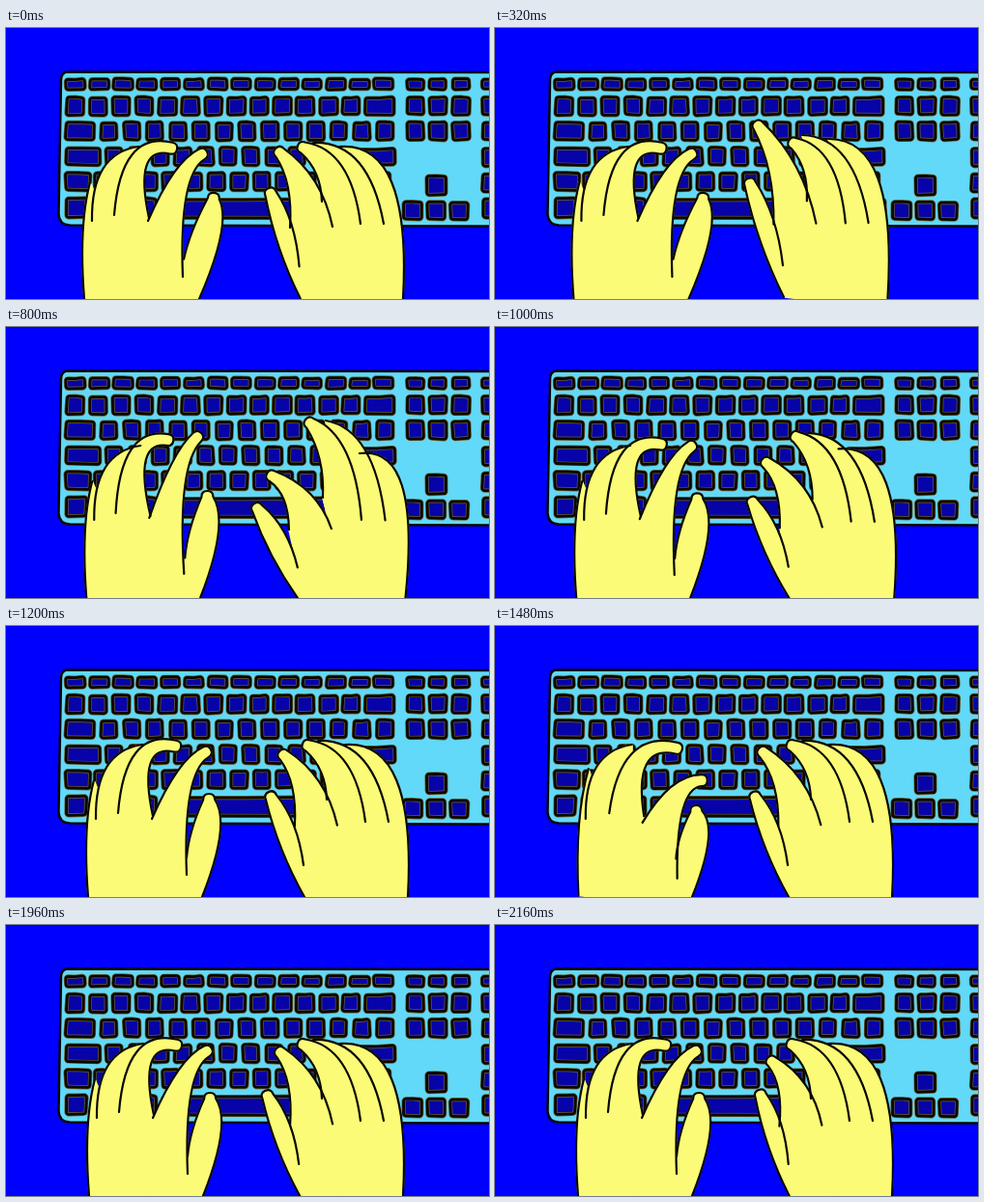
These frames come from a looping animation (500 px wide and 281 px high, 2.2 s). An HTML page with a canvas:

```html
<!DOCTYPE html>
<html lang="en">
<head>
<meta charset="utf-8">
<title>Typing hands</title>
<style>
html, body { margin: 0; width: 100%; height: 100%; overflow: hidden; background: #00f; }
canvas { display: block; }
</style>
</head>
<body>
<canvas id="stage" width="500" height="281"></canvas>
<script>
const LOOP = 2200, STEP = 40;
const SKIN = '#fcfb77', INK = '#080804';
const ctx = document.getElementById('stage').getContext('2d');

// Resting fingers, left to right: base, knuckle, tip, and for whole fingers knuckle and base again.
const hands = {
  left: {
    wrist: [140, 285],
    fingers: {
      pinky: [[86, 281], [80, 205], [92, 160]],
      ring: [[94, 200], [93, 130], [142, 123]],
      middle: [[117, 194], [124, 106], [182, 126], [137, 122], [153, 197]],
      index: [[152, 200], [179, 138], [213, 128], [184, 152], [188, 258]],
      thumb: [[188, 240], [190, 214], [211, 174], [234, 205], [204, 281]]
    }
  },
  right: {
    wrist: [355, 285],
    fingers: {
      thumb: [[304, 281], [277, 233], [267, 172], [297, 202], [303, 248]],
      index: [[294, 207], [297, 160], [279, 125], [327, 153], [338, 206]],
      middle: [[327, 180], [326, 148], [302, 122], [357, 126], [367, 203]],
      ring: [[391, 203], [375, 117], [318, 119]],
      pinky: [[411, 281], [420, 118], [346, 123]]
    }
  }
};

// Each gesture swells and fades around its moment; "all" carries the whole hand.
const gestures = [
  { at: 0, span: 1700, left: { all: [-5, 0] } },
  { at: 0, span: 300, right: { thumb: [5, -6] } },
  { at: 160, span: 520, left: { thumb: [12, -4] } },
  { at: 320, span: 320, right: { all: [-5, 0], thumb: [0, -16], index: [-5, -28],
    middle: [7, -5], ring: [5, -8], pinky: [4, -8] } },
  { at: 800, span: 360,
    left: { middle: [-6, -8], index: [-8, -18], thumb: [0, -4] },
    right: { thumb: [-10, 11], index: [-9, 27], middle: [8, -26], ring: [13, -22], pinky: [20, 8] } },
  { at: 1200, span: 300, right: { all: [5, 0], index: [-1, 5] } },
  { at: 1480, span: 280,
    left: { pinky: [5, -12], middle: [12, 2], index: [7, 32], thumb: [-3, 12] },
    right: { index: [-6, 2] } },
  { at: 2160, span: 300, right: { thumb: [6, -1], index: [3, 13] } }
];

let seed = 7;
const random = () => (seed = seed * 16807 % 2147483647) / 2147483647;
const wobble = v => v + (random() - .5) * 1.4;

function drawKey(g, x, y, w, h) {
  const c = [[x, y], [x + w, y], [x + w, y + h], [x, y + h]].map(p => p.map(wobble));
  const path = new Path2D();
  path.moveTo((c[0][0] + c[1][0]) / 2, c[0][1]);
  for (let i = 1; i <= 4; i++) path.arcTo(...c[i % 4], ...c[(i + 1) % 4], 2.5);
  path.closePath();
  g.fillStyle = '#0703a8';
  g.fill(path);
  for (const [color, width] of [['#6b6132', 4.2], ['#0a0804', 2.8]]) {
    g.strokeStyle = color;
    g.lineWidth = width;
    g.stroke(path);
  }
}

function drawKeyboard() {
  const sheet = document.createElement('canvas');
  sheet.width = 500;
  sheet.height = 281;
  const g = sheet.getContext('2d');
  g.fillStyle = '#00f';
  g.fillRect(0, 0, 500, 281);
  g.beginPath();
  g.moveTo(510, 46);
  g.lineTo(64, 45.5);
  g.quadraticCurveTo(57, 46, 57, 54);
  g.lineTo(54.5, 193);
  g.quadraticCurveTo(55, 204, 66, 204.5);
  g.lineTo(510, 205.5);
  g.fillStyle = '#62d9f8';
  g.fill();
  g.strokeStyle = INK;
  g.lineWidth = 2.5;
  g.stroke();

  const row = (x, y, w, h, n = 1, pitch = 0) => {
    for (let i = 0; i < n; i++) drawKey(g, x + i * pitch, y, w, h);
  };
  row(62.5, 53, 19, 10.5, 14, 24.5);
  row(63, 72, 17.5, 18, 13, 23.8);
  row(372, 72, 30, 18);
  row(62, 98, 29, 18);
  row(98.5, 98, 16, 18, 13, 23.8);
  row(62, 124.5, 35, 17.5);
  row(104, 124.5, 16, 17.5, 11, 23.6);
  row(364, 125.5, 38, 16.5);
  row(62, 150.5, 25, 17.5);
  row(92, 150.5, 16.5, 17.5, 11, 23.5);
  row(351, 150.5, 46, 17.5);
  row(62, 177, 21, 19);
  row(90, 177, 18, 19, 3, 23.5);
  row(162, 178, 170, 19);
  row(339, 178, 18, 19, 3, 23.5);
  // Side block and the column cut by the edge
  for (const [y, h] of [[53, 10.5], [72, 17.5], [98, 18]]) {
    row(415, y, 17, h, 3, 23.7);
    row(493.5, y, 20, h);
  }
  row(436, 154, 20, 19);
  row(412, 180.5, 18, 17.5, 3, 24);
  for (let i = 0; i < 3; i++) row(493.5, 125 + i * 26.5, 20, 18);
  return sheet;
}

const keyboard = drawKeyboard();

function shift(side, name, t) {
  const sum = [0, 0];
  for (const g of gestures) {
    const u = (t - g.at) / g.span, move = g[side] && g[side][name];
    if (!move || Math.abs(u) >= 1) continue;
    const swell = Math.cos(u * Math.PI / 2) ** 2;
    sum[0] += move[0] * swell;
    sum[1] += move[1] * swell;
  }
  return sum;
}

// Tips follow a gesture fully, knuckles half, bases barely.
const follow = [.12, .5, 1, .5, .12];

function pose(side, name, t) {
  const all = shift(side, 'all', t), own = shift(side, name, t);
  return hands[side].fingers[name].map((p, i) =>
    p.map((v, axis) => v + all[axis] + own[axis] * follow[i]));
}

function outline([base, knuckle, tip, knuckle2, base2]) {
  const path = new Path2D();
  path.moveTo(...base);
  if (!base2) {
    path.quadraticCurveTo(...knuckle, ...tip);
    return path;
  }
  const r = 6;
  const dx = tip[0] - (knuckle[0] + knuckle2[0]) / 2;
  const dy = tip[1] - (knuckle[1] + knuckle2[1]) / 2;
  const len = Math.hypot(dx, dy), ux = dx / len * r, uy = dy / len * r;
  const near = [tip[0] + uy, tip[1] - ux], far = [tip[0] - uy, tip[1] + ux];
  path.quadraticCurveTo(...knuckle, near[0] - ux, near[1] - uy);
  path.quadraticCurveTo(...near, ...tip);
  path.quadraticCurveTo(...far, far[0] - ux, far[1] - uy);
  path.quadraticCurveTo(...knuckle2, ...base2);
  return path;
}

function drawHand(side, t) {
  const { wrist, fingers } = hands[side];
  const poses = Object.keys(fingers).map(name => pose(side, name, t));
  const lines = poses.map(outline);
  const patch = path => {
    path.lineTo(...wrist);
    path.closePath();
    ctx.fill(path);
    ctx.stroke(path);
  };
  ctx.lineCap = ctx.lineJoin = 'round';
  ctx.fillStyle = ctx.strokeStyle = SKIN;
  ctx.lineWidth = 1.5;
  lines.forEach((line, i) => {
    patch(new Path2D(line));
    if (!poses[i + 1]) return;
    const web = new Path2D();
    web.moveTo(...poses[i].at(-1));
    web.lineTo(...poses[i + 1][0]);
    patch(web);
  });
  ctx.strokeStyle = INK;
  ctx.lineWidth = 2.2;
  lines.forEach(line => ctx.stroke(line));
}

function frame() {
  const t = Math.floor(performance.now() % LOOP / STEP) * STEP;
  ctx.drawImage(keyboard, 0, 0);
  drawHand('left', t);
  drawHand('right', t);
  requestAnimationFrame(frame);
}
frame();
</script>
</body>
</html>
```
